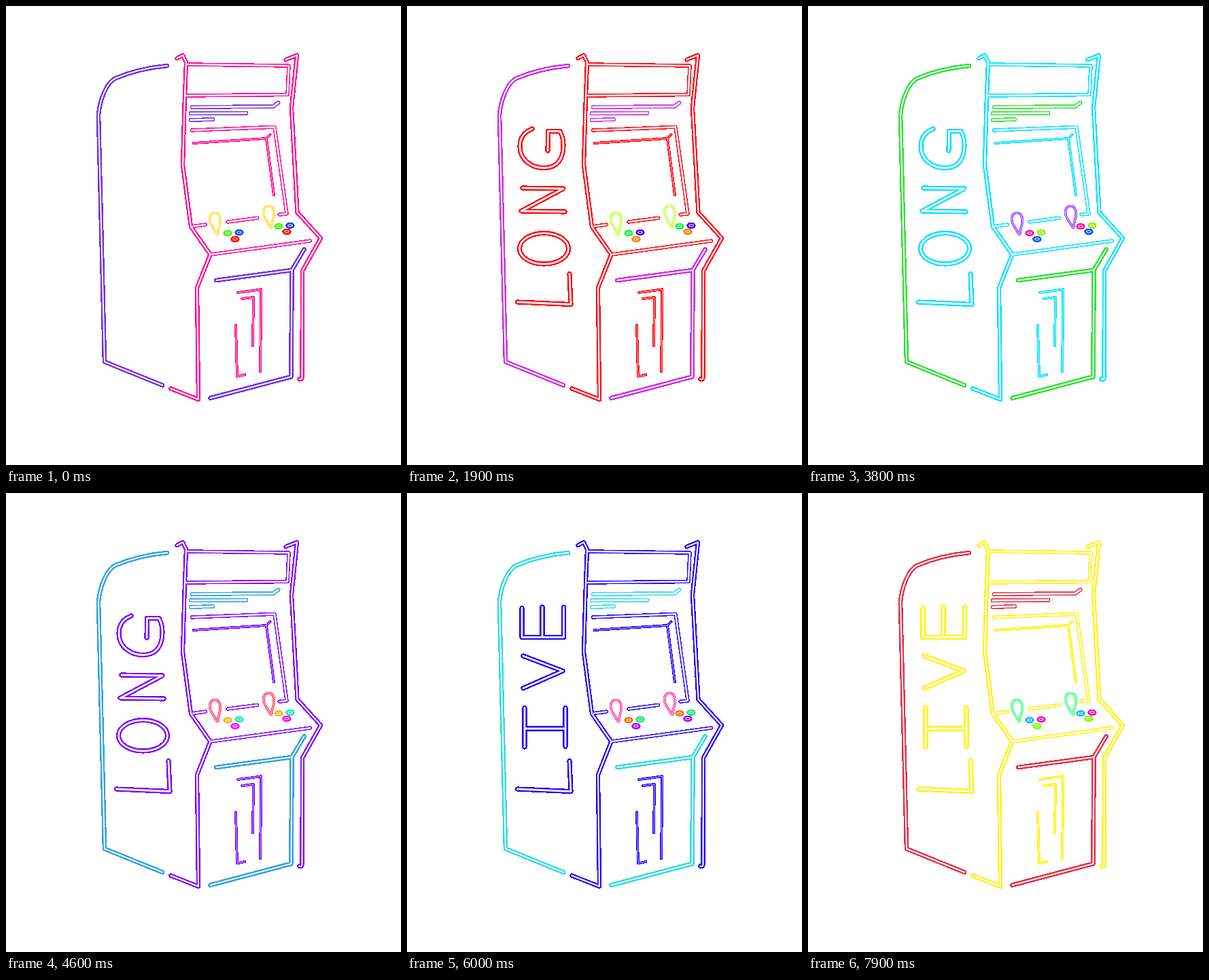
These frames come from a looping animation (581 px wide and 676 px high, 8000 ms). An HTML page:

```html
<!DOCTYPE html>
<html lang="en">
<head>
<meta charset="utf-8">
<title>Neon arcade cabinet</title>
<style>
  html, body { margin: 0; width: 100%; height: 100%; overflow: hidden; background: #fff; }
  svg { display: block; width: 581px; height: 676px; --turn: 0deg; }
  path { fill: none; stroke-linecap: round; stroke-linejoin: round; }
  .glow { stroke: hsl(calc(var(--hue) + var(--turn)) var(--sat) var(--light)); shape-rendering: crispEdges; }
  .core { stroke: hsl(calc(var(--hue) + var(--turn)) var(--sat) 97%); }
  .button { fill: hsl(calc(var(--hue) + var(--turn)) var(--sat) var(--light)); shape-rendering: crispEdges; }
  .ring { fill: none; stroke: hsl(calc(var(--hue) + var(--turn)) var(--sat) 90%); }
</style>
</head>
<body>
<svg viewBox="0 0 581 676"></svg>
<script>
const svg = document.querySelector('svg');

// hue, saturation %, lightness %
const PINK = [327, 100, 50], VIOLET = [262, 74, 53], GOLD = [49, 100, 68];
const GREEN = [105, 90, 50], BLUE = [225, 92, 49], RED = [0, 100, 50];

function add(parent, tag, attrs = {}) {
  const node = document.createElementNS('http://www.w3.org/2000/svg', tag);
  for (const key in attrs) node.setAttribute(key, attrs[key]);
  return parent.appendChild(node);
}

function group([hue, sat, light]) {
  return add(svg, 'g', { style: `--hue:${hue}deg;--sat:${sat}%;--light:${light}%` });
}

// Each tube is [outer width, core width, path]; cores go last so joints stay open.
function neon(color, tubes) {
  const g = group(color);
  for (const [width, , d] of tubes) add(g, 'path', { class: 'glow', d, 'stroke-width': width });
  for (const [, core, d] of tubes) add(g, 'path', { class: 'core', d, 'stroke-width': core });
  return g;
}

function button(color, x, y) {
  const g = group(color);
  add(g, 'ellipse', { class: 'button', cx: x, cy: y, rx: 6.7, ry: 4.7 });
  add(g, 'ellipse', { class: 'ring', cx: x, cy: y, rx: 3.1, ry: 1.6, 'stroke-width': 1.2 });
}

const letters = paths => neon(PINK, paths.map(d => [7.2, 2.8, d]));

// Side panel, vents and lower front
neon(VIOLET, [
  [6.6, 2.1, 'M237 88Q195 92 161 106.5C147 113 138 140 136 160L145 524L230 558.5'],
  [6, 2.9, 'M273.5 149L393 148L400.5 142.5'],
  [6, 2.9, 'M271.5 158.3L353.5 157.7'],
  [6, 2.9, 'M271.5 168L304.5 167'],
  [6.6, 2, 'M309.5 404L420.5 389L438.5 358.5'],
  [6.8, 2.1, 'M420.5 389L419.5 546L300.5 577.5'],
]);

// Cabinet frame, marquee, screen, panel edge and coin door
neon(PINK, [
  [6.4, 2.3, 'M251.5 77L260 72.5L265 83L263 132L260 234L272 325L300.5 366L281 415L283 579.5L242.5 563.5'],
  [6.4, 2.3, 'M411.5 79L428 72.5L420 150L428.5 304L463 342L436 390L435.5 547Q435.5 551 431.5 549.5'],
  [5.6, 2.7, 'M267 86L416 88L414 130.5L265 132'],
  [5.4, 2.6, 'M273.5 183L395 178.3L413 306L402 307.2'],
  [3.9, 0.8, 'M275.5 202L383 195L388.5 189.5M383 195L394 278.5'],
  [5.4, 2.5, 'M275 324.5L293.5 322'],
  [5.4, 2.5, 'M326 318L369.5 312.3'],
  [5.4, 2.5, 'M301 366L447.5 346'],
  [3.9, 0.8, 'M341 422L375.5 417.3L374 538.5'],
  [3.9, 0.8, 'M347 431L364 429L363 500.5'],
  [3.9, 0.8, 'M338 470L340 545.5L351.5 543'],
]);

// Control panel
const stick = 'M310 336C306 327 299.5 322 299.5 314C299.5 301 315.5 301 315.5 316C315.5 323 312 328 311.5 336Z';
for (const shift of ['', 'translate(79 -10)'])
  neon(GOLD, [[3.9, 0.6, stick]]).setAttribute('transform', shift);
button(GREEN, 326, 334.5);
button(BLUE, 343, 333.5);
button(RED, 337, 343.3);
button(GREEN, 401, 324.5);
button(BLUE, 418, 323.3);
button(RED, 413, 332.2);

// Words read upwards along the side panel
const L = 'M162.5 436L241 439.5L239 394.5';
const long = letters([
  L,
  'M165.5 357.3a36 22.7 0 1 1 72 0a36 22.7 0 1 1 -72 0',
  'M170 268L230 269L168 302L232 303',
  'M184 181C171 186 166 196 166 207C166 226 183 239 203 238.5C222 238 230 224 230 205Q230 193 225 184.5L207.5 184.5L207 213',
]);
const live = letters([
  L,
  'M173 316.5V374M233 316.5V373.5M173 347H233',
  'M171 240L229 262L171 287.5',
  'M169 169.5V212.5H230.5V168M199 168V212.5',
]);

// Each act restarts the hue wheel at its first step.
const ACTS = [
  { from: 0, turn: 10 },
  { from: 15, turn: 10, word: long },
  { from: 51, turn: -10, word: live },
];
const LOOP = 8000, STEP = 100;
const start = performance.now();

function draw() {
  const time = Math.max(0, performance.now() - start) % LOOP;
  const step = Math.max(0, Math.floor(time / STEP) - 1);
  const act = ACTS.findLast(a => step >= a.from);
  svg.style.setProperty('--turn', (step - act.from) * act.turn + 'deg');
  for (const word of [long, live]) word.style.display = word === act.word ? '' : 'none';
  requestAnimationFrame(draw);
}
draw();
</script>
</body>
</html>
```
